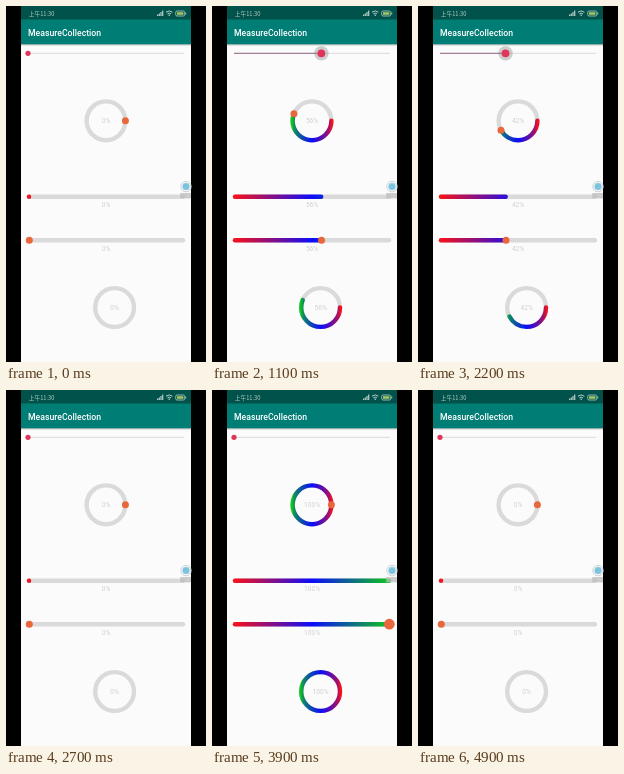
An HTML page for the animation above (5.4 s loop, 200 by 356 pixels).

```html
<!DOCTYPE html>
<html lang="en">
<head>
<meta charset="utf-8">
<title>Progress widgets</title>
<style>
  html, body { margin: 0; width: 100%; height: 100%; overflow: hidden; background: #000; }
  svg { display: block; width: 100vw; height: 100vh; }
  text { font-family: Roboto, "Noto Sans", sans-serif; }
  .pct { font-size: 6.6px; fill: #d0d1d0; text-anchor: middle; }
  .track { stroke: #d9dad9; }
  .round { fill: none; stroke-width: 4.4; stroke-linecap: round; }
  .knob { fill: #e9673d; }
</style>
</head>
<body>
<svg viewBox="0 0 200 356" xmlns="http://www.w3.org/2000/svg">
  <defs>
    <linearGradient id="barFill" gradientUnits="userSpaceOnUse" x1="23" y1="0" x2="177" y2="0">
      <stop offset="0" stop-color="#f5121c"/>
      <stop offset=".5" stop-color="#0c0cfa"/>
      <stop offset="1" stop-color="#10c41e"/>
    </linearGradient>
    <linearGradient id="ringFill" x1="1" y1="0" x2="0" y2="0"></linearGradient>
    <linearGradient id="shade" x1="0" y1="0" x2="0" y2="1">
      <stop offset="0" stop-color="#000" stop-opacity=".25"/>
      <stop offset="1" stop-color="#000" stop-opacity="0"/>
    </linearGradient>
  </defs>

  <rect width="200" height="356" fill="#000"/>
  <rect x="15" width="170" height="356" fill="#fafbfa"/>
  <rect x="15" y="38" width="170" height="2.5" fill="url(#shade)"/>
  <rect x="15" y="13" width="170" height="25.3" fill="#007d74"/>
  <rect x="15" width="170" height="13.5" fill="#00524b"/>
  <text x="22" y="30" font-size="8.7" font-weight="500" fill="#fff">MeasureCollection</text>

  <g fill="#b9d0cb">
    <text x="22.8" y="9.6" font-size="5.7" style="font-family:'Noto Sans CJK SC','Noto Sans CJK',sans-serif">上午11:30</text>
    <path d="M151 10V8.6h1.2V10zM152.7 10V7.4h1.2V10zM154.4 10V6h1.2V10zM156.1 10V4.6h1.2V10z"/>
    <path d="M160 6.2Q163.2 3.6 166.4 6.2M161.4 7.9Q163.2 6.4 165 7.9" fill="none" stroke="#b9d0cb"/>
    <circle cx="163.2" cy="9.3" r=".8"/>
    <rect x="169.7" y="5" width="9" height="5" rx="1.4" fill="none" stroke="#b9d0cb" stroke-width=".8"/>
    <rect x="171" y="6.2" width="6.4" height="2.6" fill="#a3c65c"/>
    <rect x="179.3" y="6.5" width=".9" height="2"/>
  </g>

  <path class="track" d="M22 47.3H178"/>
  <path id="thin" stroke="#97678a"/>
  <circle id="halo" cy="47.3" fill="#7d7d80" fill-opacity=".36"/>
  <circle id="thumb" cy="47.3" fill="#e0345a"/>

  <g id="widgets"></g>

  <rect x="174.2" y="187" width="10.8" height="5.4" fill="#bcbdbc" fill-opacity=".75"/>
  <circle cx="180" cy="180.6" r="5.2" fill="#f3f6f7" stroke="#c3c8ca" stroke-width=".8"/>
  <circle cx="180" cy="180.6" r="3.5" fill="#7cc3e0"/>
</svg>
<script>
const LOOP = 5400, STEP = 100, R = 19.4;
const get = id => document.getElementById(id);

function add(parent, tag, attrs) {
  const el = document.createElementNS('http://www.w3.org/2000/svg', tag);
  parent.append(el);
  return set(el, attrs);
}

function set(el, attrs) {
  for (const k in attrs) el.setAttribute(k, attrs[k]);
  return el;
}

// [time, value] pairs, joined by straight lines
const progress = [
  [0, 0], [100, .01], [600, .03], [700, .1], [1100, .56], [1700, 1], [1800, 1],
  [1900, .99], [2000, .86], [2300, .2], [2400, .03], [2500, 0],
  [3100, 0], [3200, .05], [3500, .46], [3900, 1], [4100, 1],
  [4200, .95], [4600, .16], [4700, .02], [4900, 0]
];
const seekPress = [[400, 0], [700, 1], [2400, 1], [2700, 0]];
const barPress = [[3100, 0], [3300, 1], [4700, 1], [4900, 0]];

function at(keys, t) {
  const i = keys.findIndex(k => k[0] > t);
  if (i < 0) return keys[keys.length - 1][1];
  if (i === 0) return keys[0][1];
  const [t0, a] = keys[i - 1], [t1, b] = keys[i];
  return a + (b - a) * (t - t0) / (t1 - t0);
}

// Sweep red-blue-green-blue-red, mirrored about the horizontal axis
const hues = [[245, 18, 28], [12, 12, 250], [16, 196, 30]];
for (let i = 0; i <= 24; i++) {
  const pos = i / 12, n = Math.min(1, Math.floor(pos));
  const rgb = hues[n].map((c, j) => Math.round(c + (hues[n + 1][j] - c) * (pos - n)));
  add(get('ringFill'), 'stop', {
    offset: (1 - Math.cos(i / 24 * Math.PI)) / 2,
    'stop-color': `rgb(${rgb})`
  });
}

const root = get('widgets');
const label = (x, y) => add(root, 'text', { class: 'pct', x, y: y + 2.4 });
const knob = () => add(root, 'circle', { class: 'knob', r: 3.5 });

function ring(cx, cy, hasKnob) {
  const base = { cx, cy, r: R };
  add(root, 'circle', { ...base, class: 'round track' });
  const arc = add(root, 'circle', { ...base, class: 'round', stroke: 'url(#ringFill)' });
  const text = label(cx, cy);
  const dot = hasKnob && knob();
  return p => {
    const len = 2 * Math.PI * R, a = 2 * Math.PI * p;
    set(arc, {
      'stroke-dasharray': p < 1 ? `${p * len} ${len}` : 'none',
      visibility: p > 0 ? 'visible' : 'hidden'
    });
    text.textContent = Math.round(p * 100) + '%';
    if (dot) set(dot, { cx: cx + R * Math.cos(a), cy: cy + R * Math.sin(a) });
  };
}

function bar(y, hasKnob) {
  add(root, 'path', { class: 'round track', d: `M23 ${y}H177` });
  const fill = add(root, 'path', { class: 'round', stroke: 'url(#barFill)' });
  const text = label(100, y + 8);
  const dot = hasKnob && knob();
  return (p, press) => {
    const x = 23 + 154 * p;
    set(fill, { d: `M23 ${y}H${x + .01}` });
    text.textContent = Math.round(p * 100) + '%';
    if (dot) set(dot, { cx: x + .3, cy: y, r: 3.5 + 1.9 * press });
  };
}

const parts = [ring(100, 114.8, true), bar(190.7, false), bar(234.2, true), ring(108.6, 301.5, false)];

function draw(ms) {
  const t = Math.floor(ms % LOOP / STEP) * STEP;
  const p = at(progress, t), press = at(seekPress, t);
  const x = 22 + 156 * (t < 3000 ? p : 0);
  set(get('thin'), { d: `M22 47.3H${x}` });
  set(get('halo'), { cx: x, r: 7.2 * press });
  set(get('thumb'), { cx: x, r: 2.6 + 1.3 * press });
  for (const part of parts) part(p, at(barPress, t));
}

const start = performance.now();
function tick() {
  draw(performance.now() - start);
  requestAnimationFrame(tick);
}
tick();
</script>
</body>
</html>
```
